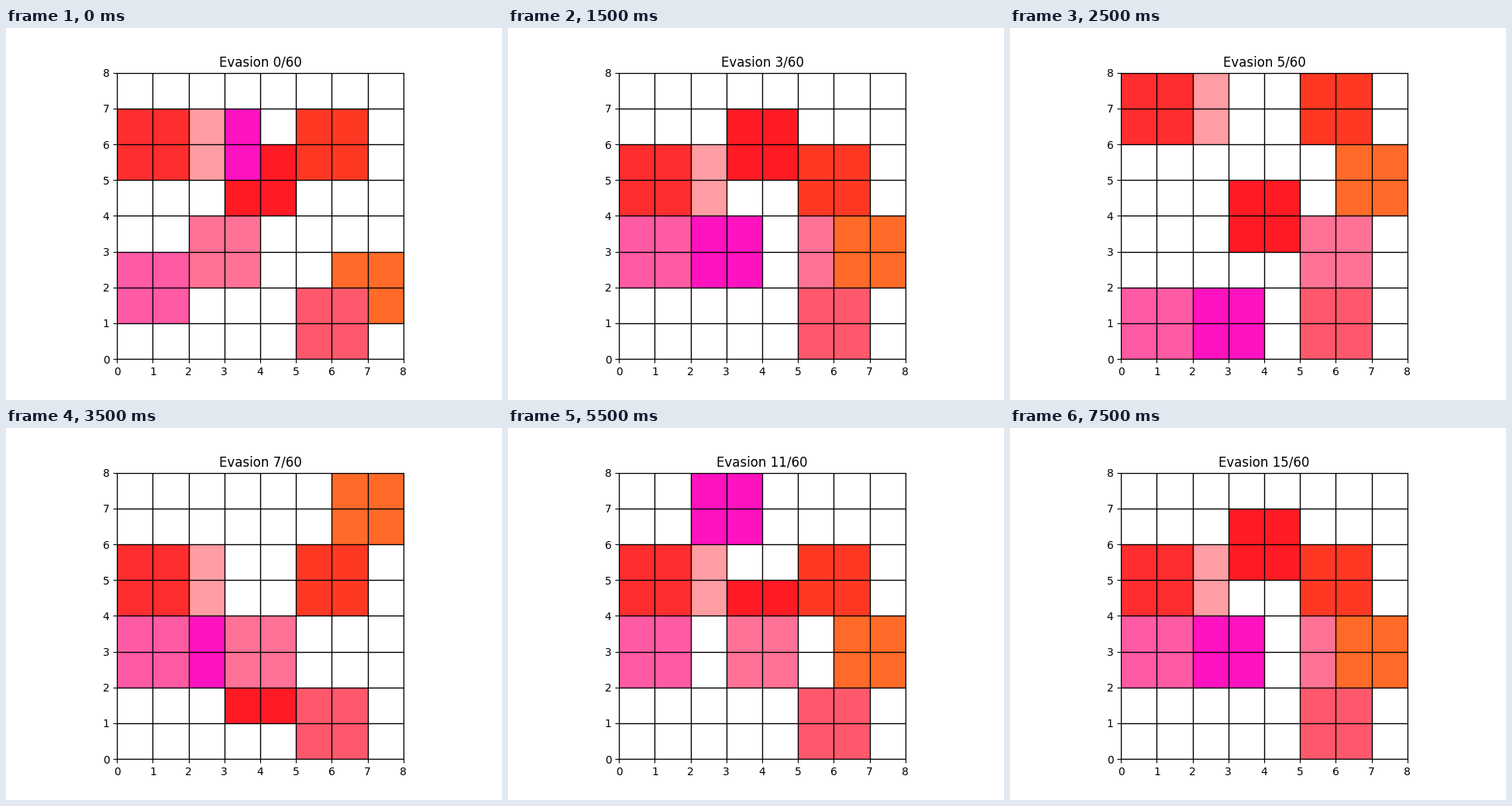
A matplotlib script that plays this animation: 640x480 px, repeating every 8 s.

```python
import numpy as np
import matplotlib.pyplot as plt
from matplotlib.animation import FuncAnimation
from matplotlib.colors import to_rgb

plt.rcParams["text.kerning_factor"] = 6

N = 8          # cells per side
STEPS = 16
TOTAL = 60     # number shown in the title

# 2x2 blocks, painted in this order:
# colour, x, y, axis of travel, lowest and highest position, direction
BLOCKS = [
    ("#ff3824", 5, 5, "y", 4, 6, 1),
    ("#ff1a24", 3, 4, "y", 0, 6, 1),
    ("#ff12c0", 2, 5, "y", 0, 6, -1),
    ("#ff9da4", 1, 5, "y", 4, 6, 1),
    ("#ff2d2d", 0, 5, "y", 4, 6, 1),
    ("#ff7295", 2, 2, "x", 1, 6, 1),
    ("#ff6a28", 6, 1, "y", 0, 6, -1),
    ("#ff586c", 5, 0, None, 0, 0, 0),
    ("#ff5aa4", 0, 1, "y", 0, 2, -1),
]


def bounce(start, lo, hi, direction, step):
    """Position after `step` unit moves, turning round at lo and hi."""
    span = hi - lo
    phase = (direction * (start - lo) + step) % (2 * span)
    return lo + span - abs(span - phase)


def board(step):
    cells = np.ones((N, N, 3))
    for color, x, y, axis, lo, hi, direction in BLOCKS:
        if axis == "x":
            x = bounce(x, lo, hi, direction, step)
        elif axis == "y":
            y = bounce(y, lo, hi, direction, step)
        cells[y:y + 2, x:x + 2] = to_rgb(color)
    return cells


fig, ax = plt.subplots(figsize=(6.4, 4.8), dpi=100)
ax.set_aspect("equal")
edges = np.arange(N + 1)
mesh = ax.pcolormesh(edges, edges, board(0))
ax.set_xticks(edges)
ax.set_yticks(edges)
ax.set_axisbelow(False)
ax.grid(color="k", linewidth=1)
title = ax.set_title(f"Evasion 0/{TOTAL}")


def update(step):
    mesh.set_array(board(step))
    title.set_text(f"Evasion {step}/{TOTAL}")
    return mesh, title


anim = FuncAnimation(fig, update, frames=STEPS, interval=500,
                     repeat=True, repeat_delay=0, blit=False)
plt.show()
```
